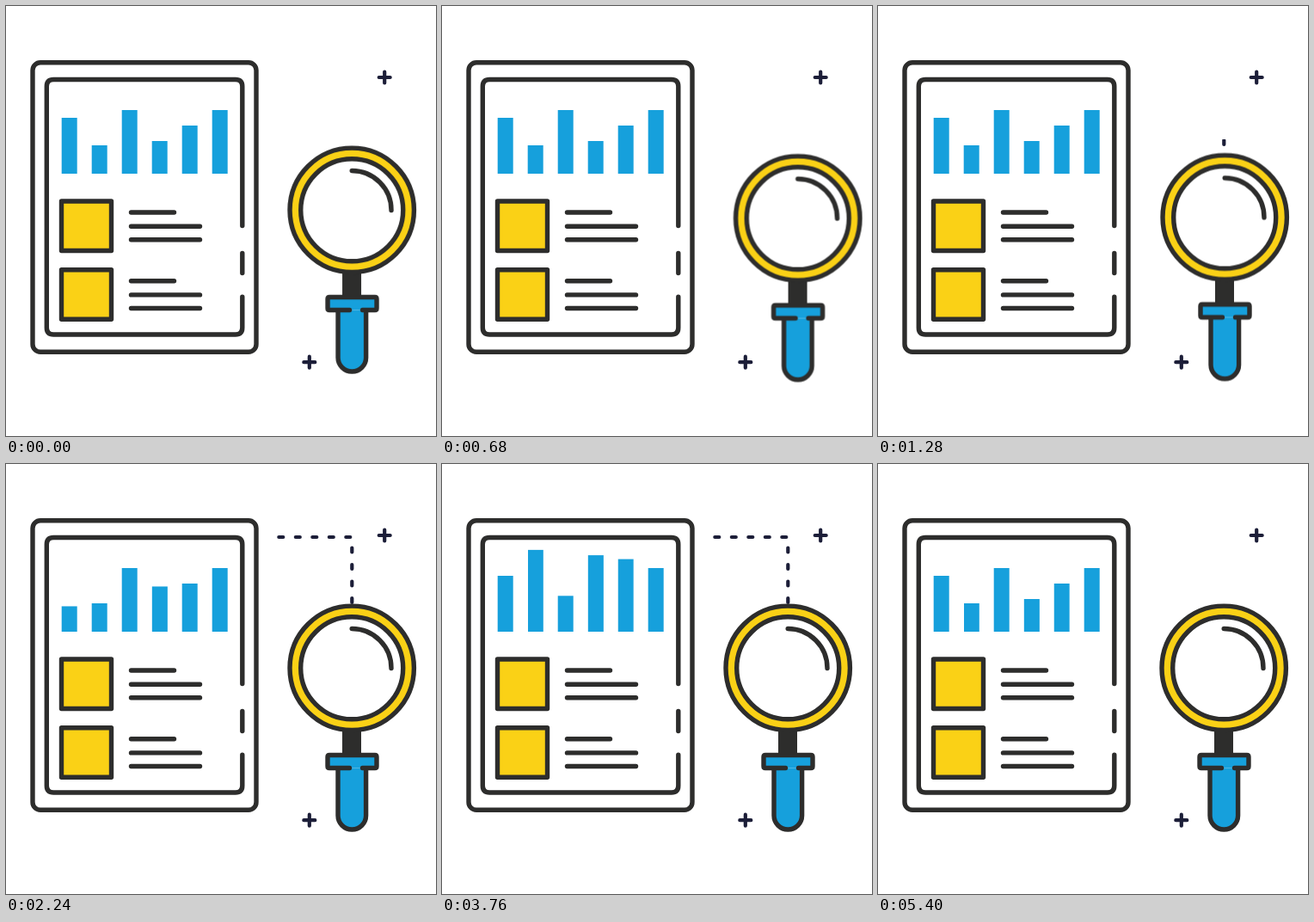
An HTML page that plays this animation: 500x500 px, repeating every 6.16 s.

```html
<!DOCTYPE html>
<html lang="en">
<head>
<meta charset="utf-8">
<title>Report research</title>
<style>
  html, body { margin: 0; width: 100%; height: 100%; overflow: hidden; background: #fff; }
  svg { display: block; width: 100%; height: 100%; }
  .ink { fill: none; stroke: #2d2d2c; stroke-width: 5.4; stroke-linecap: round; stroke-linejoin: round; }
  .blue { fill: #16a0dc; }
  .yellow { fill: #fad116; }
  .white { fill: #fff; }
  .navy { fill: none; stroke: #1c1e38; stroke-width: 4.2; stroke-linecap: round; stroke-linejoin: round; }
  #bars rect { transform-box: fill-box; transform-origin: 50% 100%; }
  #reveal { fill: none; stroke: #fff; stroke-width: 14; stroke-dasharray: 182; stroke-dashoffset: 182; }
</style>
</head>
<body>
<svg viewBox="0 0 500 500">
  <defs>
    <mask id="trim" maskUnits="userSpaceOnUse" x="0" y="0" width="500" height="500">
      <path id="reveal" d="M402.3 166V85H301"/>
    </mask>
    <g id="entry">
      <rect class="ink yellow" x="64.5" y="227" width="58" height="57.5"/>
      <path class="ink" d="M145.5 240H195.5M145.5 256.2H225.5M145.5 271.8H225.5"/>
    </g>
    <path id="plus" class="navy" d="M-6.5 0H6.5M0-6.5V6.5"/>
  </defs>

  <rect class="ink" x="31" y="65.8" width="260" height="336.4" rx="9"/>
  <path class="ink" d="M274.8 255.5V93.5q0-8-8-8H55.3q-8 0-8 8V374q0 8 8 8H266.8q8 0 8-8V338.3M274.8 287.5V310.5"/>
  <g id="bars" class="blue"></g>
  <use href="#entry"/>
  <use href="#entry" y="79.7"/>

  <use href="#plus" x="440.2" y="83"/>
  <use href="#plus" x="352.8" y="414.2"/>
  <g mask="url(#trim)">
    <path class="navy" d="M402.3 161V85H305" stroke-dasharray="5 14.5"/>
  </g>

  <g id="swayX"><g id="swayY">
    <rect x="391" y="306" width="22" height="34" fill="#2d2d2c"/>
    <circle class="ink yellow" cx="402.2" cy="237.3" r="72.2"/>
    <circle class="ink white" cx="402.2" cy="237.3" r="59.5"/>
    <path class="ink" d="M402.2 191.5A45.8 45.8 0 0 1 448 237.5"/>
    <path class="ink blue" d="M386 353.5V408.7a16.3 16.3 0 0 0 32.6 0V353.5"/>
    <path class="ink blue" d="M399.5 353.5H376q-2 0-2-2V340.5q0-2 2-2H429q2 0 2 2V351.5q0 2-2 2H414.5"/>
  </g></g>
</svg>
<script>
  const LOOP = 6160;
  const SINE = 'cubic-bezier(.37,0,.63,1)';
  const IN = 'cubic-bezier(.4,0,.75,.7)';
  const OUT = 'cubic-bezier(.25,.3,.6,1)';
  const byId = id => document.getElementById(id);

  // Keys are [time, value, easing towards the next key].
  function track(el, prop, format, keys) {
    const all = [[0, keys[0][1]], ...keys, [LOOP, keys[keys.length - 1][1]]];
    const frames = all.map(([time, value, easing = SINE]) =>
      ({ offset: time / LOOP, [prop]: format(value), easing }));
    el.animate(frames, { duration: LOOP, iterations: Infinity });
  }

  track(byId('swayX'), 'transform', v => `translateX(${v}px)`,
    [[0, 0, IN], [400, 14, OUT], [500, 17], [1000, -2], [1280, 1], [1500, 0]]);
  track(byId('swayY'), 'transform', v => `translateY(${v}px)`,
    [[0, 0, IN], [400, 3, 'linear'], [680, 9.5, OUT], [980, 20, IN], [1280, 8.5, OUT], [1560, 0]]);
  track(byId('reveal'), 'strokeDashoffset', v => v,
    [[1240, 182, 'linear'], [1920, 0], [4760, 0, 'linear'], [5400, 182]]);

  // Each bar: resting height, then [time, height] keys.
  const BASE = 195;
  const bars = [
    [65, [[2000, 65], [2300, 26], [2640, 26], [3440, 65]]],
    [33, [[2560, 33], [3000, 98], [3200, 92], [3720, 92], [3800, 98], [4160, 33]]],
    [74, [[2480, 74], [3000, 41], [3720, 41], [4160, 74]]],
    [38, [[2080, 38], [2560, 96], [2720, 90], [3720, 90], [4160, 38]]],
    [56, [[2280, 56], [2720, 85], [3720, 85], [4160, 56]]],
    [74, [[2660, 74], [3040, 30], [3440, 74]]]
  ];
  bars.forEach(([height, keys], i) => {
    const bar = document.createElementNS('http://www.w3.org/2000/svg', 'rect');
    const box = { x: 64.7 + 35 * i, y: BASE - height, width: 18, height };
    for (const name in box) bar.setAttribute(name, box[name]);
    byId('bars').append(bar);
    track(bar, 'transform', v => `scaleY(${v / height})`, keys);
  });
</script>
</body>
</html>
```
